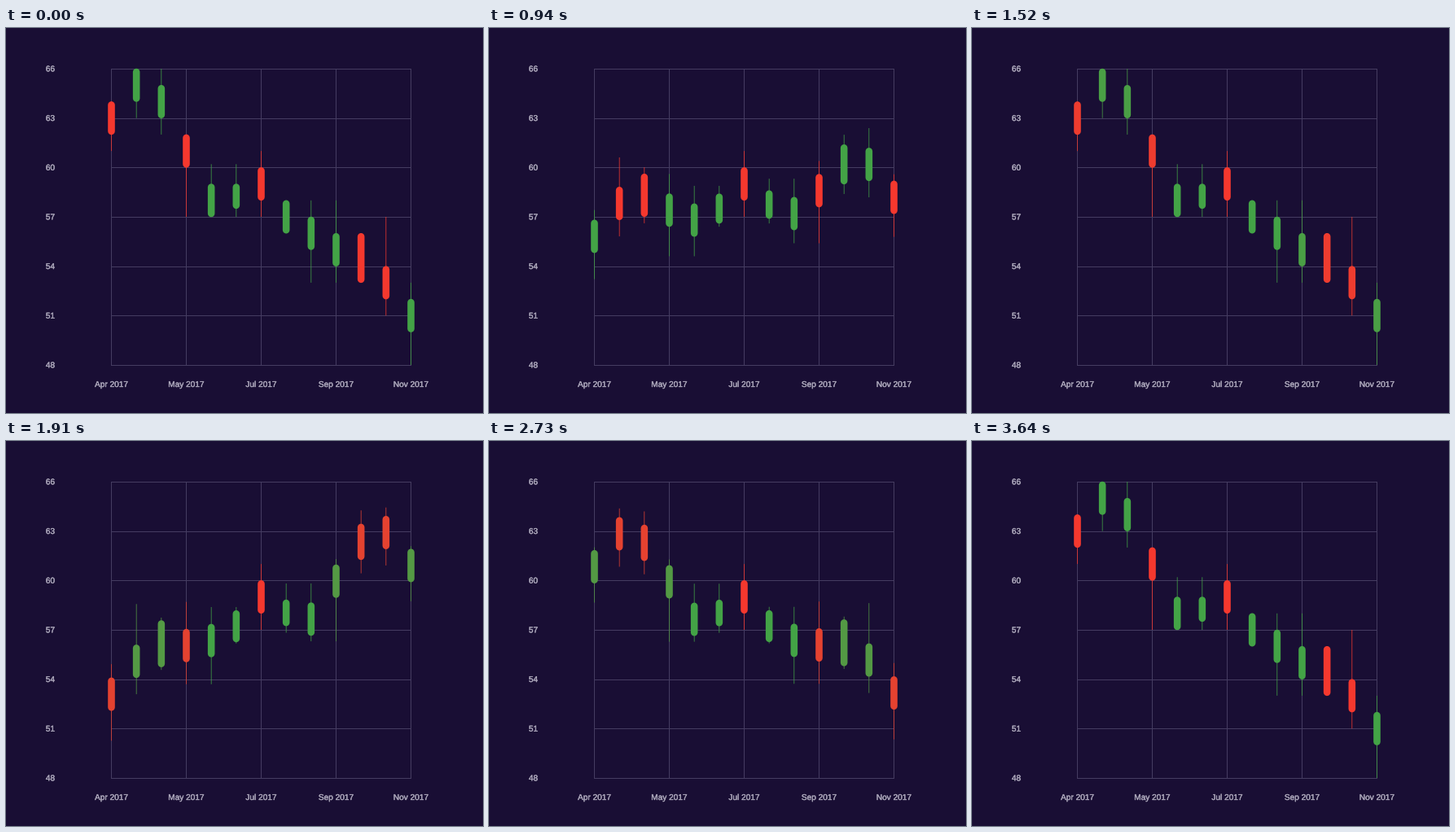
Animation of 586 by 473 pixels, one loop 3.73 s. Source, as a matplotlib script:

```python
import numpy as np
import matplotlib.pyplot as plt
from matplotlib.animation import FuncAnimation
from matplotlib.collections import LineCollection
from matplotlib.patheffects import withStroke

W, H, DPI = 586, 473, 64
PX = 72 / DPI                      # points per pixel
LOOP, STEP, TICK = 3730, 10, 30    # ms
RUN = 800                          # length of one reversal, ms

LEFT, RIGHT, TOP, BOTTOM = 129.5, 497.5, 50, 414
V_MIN, V_MAX = 48, 66
BODY = 8.6                         # body width, px

BG, GRID, TEXT = "#190e34", "#453c61", "#a9a4b8"
RED = np.array([245, 56, 46]) / 255
GREEN = np.array([67, 163, 70]) / 255

# (start, first drawn) of each reversal; the order flips every time
REVERSALS = [(10, 60), (862, 910), (1674, 1760), (2498, 2670)]


def levels(steps):
    """Price that holds from each given candle until the next one."""
    starts = list(steps)
    held = np.searchsorted(starts, np.arange(13), side="right") - 1
    return np.array(list(steps.values()))[held]


def make_candles():
    """Columns: low, body bottom, body top, high, rising."""
    i = np.arange(13)
    trend = {0: 62, 1: 64, 2: 63, 4: 57, 6: 58, 7: 56, 11: 52, 12: 50}
    bottom = np.interp(i, list(trend), list(trend.values()))
    top = np.floor(bottom) + np.where(i == 10, 3, 2)
    support = levels({0: 61, 1: 63, 2: 62, 3: 57, 8: 53, 11: 51, 12: 48})
    resistance = levels({0: 64, 1: 66, 3: 62, 4: 60.2, 6: 61, 7: 58, 11: 57, 12: 53})
    # one falling candle takes up the whole span between its levels
    resistance = np.where(i == 10, top, resistance)
    rising = ~np.isin(i, [0, 3, 6, 10, 11])
    return np.column_stack([np.minimum(bottom, support), bottom, top,
                            np.maximum(top, resistance), rising])


def to_y(value):
    return BOTTOM - (value - V_MIN) * (BOTTOM - TOP) / (V_MAX - V_MIN)


def ease_out(t):
    return 1 - (1 - t) ** 5


def fade(t):
    s = np.clip((t - 0.15) / 0.75, 0, 1)
    return s * s * (3 - 2 * s)


falling = make_candles()
climbing = falling[::-1]
xs = np.linspace(LEFT, RIGHT, len(falling))


def candles_at(ms):
    old, new, t = climbing, falling, 1.0
    for start, shown in REVERSALS:
        if ms >= shown:
            old, new = new, old
            tick = ms - (ms - shown) % TICK
            t = min((tick - start) / RUN, 1)
    prices = old[:, :4] + (new - old)[:, :4] * ease_out(t)
    rising = old[:, 4] + (new - old)[:, 4] * fade(t)
    return to_y(prices), RED + rising[:, None] * (GREEN - RED)


def vertical(y0, y1):
    return np.stack([np.column_stack([xs, y0]), np.column_stack([xs, y1])], axis=1)


fig = plt.figure(figsize=(W / DPI, H / DPI), dpi=DPI, facecolor=BG)
ax = fig.add_axes([0, 0, 1, 1])
ax.set_xlim(0, W)
ax.set_ylim(H, 0)
ax.axis("off")


def add_lines(segments, width, z, **style):
    lines = LineCollection(segments, linewidths=width * PX, snap=False, zorder=z, **style)
    ax.add_collection(lines)
    return lines


values = range(V_MIN, V_MAX + 1, 3)
columns = np.linspace(LEFT, RIGHT, 5)
rows = [round(to_y(v)) + 0.5 for v in values]
grid = [[(LEFT - 0.5, y), (RIGHT + 0.5, y)] for y in rows]
grid += [[(x, TOP), (x, BOTTOM + 1)] for x in columns]
add_lines(grid, 1, 1, colors=GRID, capstyle="butt")

font = dict(family="Liberation Sans", size=10.1 * PX, color=TEXT, va="baseline",
            path_effects=[withStroke(linewidth=0.35 * PX, foreground=TEXT)])
for v in values:
    ax.text(48.8, to_y(v) + 3.4, str(v), ha="left", **font)
for x, month in zip(columns, ["Apr", "May", "Jul", "Sep", "Nov"]):
    ax.text(x, 441, f"{month} 2017", ha="center", **font)

wicks = add_lines([], 0.75, 2, capstyle="butt")
bodies = add_lines([], BODY, 3, capstyle="round")


def draw(i):
    y, colors = candles_at(i * STEP)
    low, bottom, top, high = y.T
    wicks.set_segments(vertical(low, high))
    bodies.set_segments(vertical(bottom - 4, top + 4))
    wicks.set_color(colors)
    bodies.set_color(colors)
    return wicks, bodies


anim = FuncAnimation(fig, draw, frames=LOOP // STEP, interval=STEP, repeat=True,
                     repeat_delay=0, blit=False)
plt.show()
```
